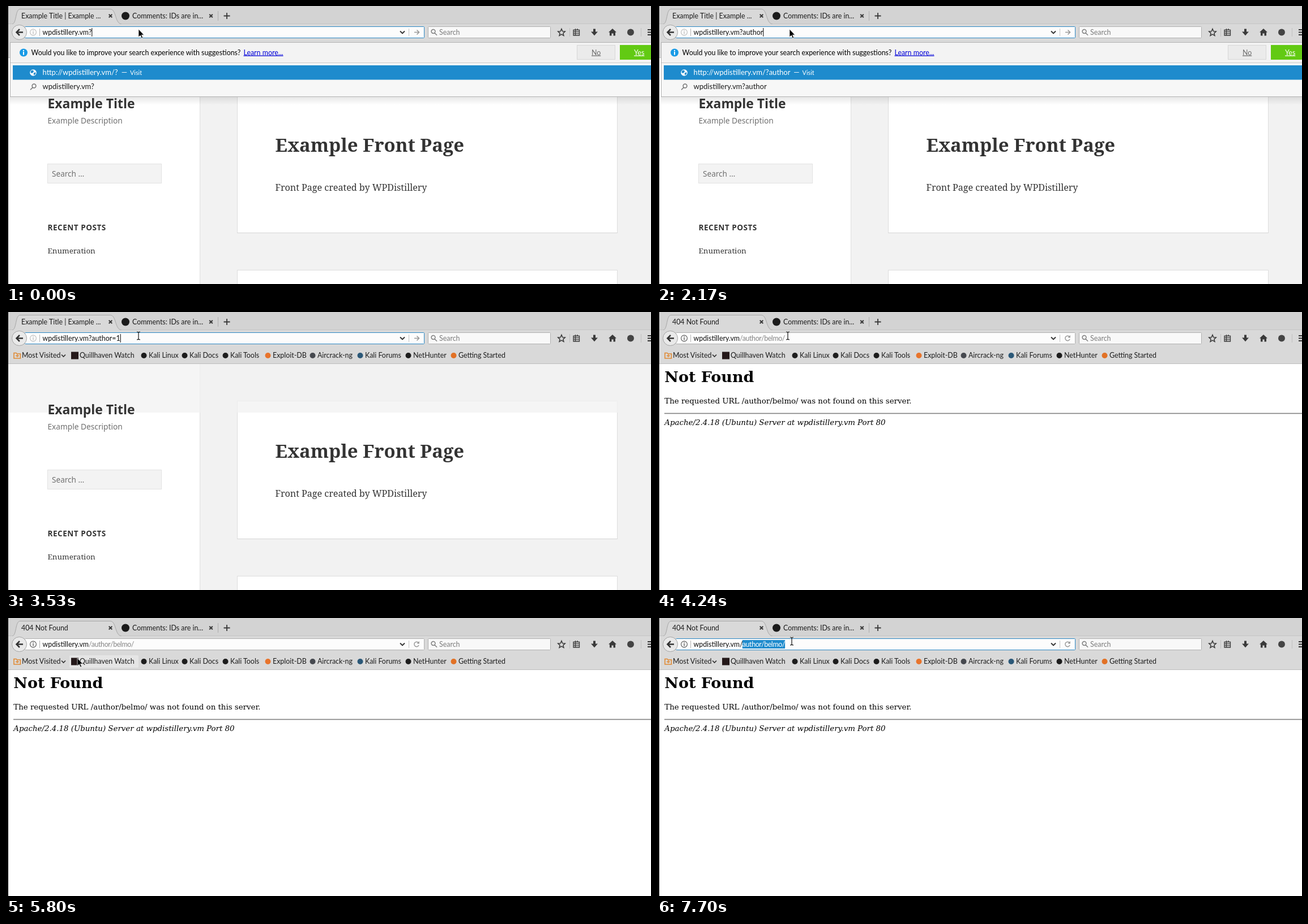
An HTML page for the animation above (8 s loop, 1139 px wide and 492 px high).

```html
<!DOCTYPE html>
<html lang="en">
<head>
<meta charset="utf-8">
<title>Browser address bar</title>
<style>
  html, body { margin: 0; width: 100%; height: 100%; overflow: hidden; background: #fff; }
  svg { display: block; width: 1139px; height: 492px; }
  text { white-space: pre; }
  .ui { font: 12.4px Lato, "Open Sans", sans-serif; fill: #1c1c1c; }
  .list { font-size: 13.05px; }
  .sans { font-family: "Noto Sans", "Open Sans", sans-serif; fill: #333; }
  .serif { font-family: "Noto Serif", serif; fill: #333; }
  .plain { font: 13.36px "DejaVu Serif", serif; fill: #000; }
  .path { letter-spacing: -.38px; }
  .line { fill: none; stroke: #3a3a3a; stroke-width: 1.7; }
</style>
</head>
<body>
<svg id="stage" viewBox="0 0 1139 492" xmlns="http://www.w3.org/2000/svg"></svg>
<script>
const LOOP = 8000;
const HOST = 'wpdistillery.vm';

const typed = [
  [0, '?'], [120, '?a'], [270, '?au'], [550, '?aut'], [830, '?auth'], [950, '?autho'],
  [1100, '?authoe'], [1220, '?authoer'], [2020, '?autho'], [2170, '?author'],
  [2700, '?author='], [3410, '?author=1'], [3650, '/?author=1'], [3800, '/author/belmo/']
];
const phases = [[0, 'typing'], [3530, 'closing'], [3650, 'loading'], [3800, 'loaded'], [7060, 'select']];
// number of selected characters
const picks = [[0, 0], [7190, 6], [7310, 13]];
const hovers = [[0, false], [4940, true], [5100, false], [5250, true], [5950, false]];
// time, x, y, shape
const pointers = [
  [0, 234, 41, 'arrow'], [3530, 234, 42, 'beam'], [4240, 231, 42, 'beam'],
  [4390, 207, 43, 'beam'], [4520, 184, 45, 'beam'], [4670, 158, 44, 'beam'],
  [4820, 142, 58, 'arrow'], [4940, 124, 70, 'arrow'], [5100, 120, 53, 'arrow'],
  [5250, 117, 57, 'arrow'], [5410, 181, 14, 'arrow'], [5560, 193, 16, 'arrow'],
  [5680, 162, 44, 'beam'], [5800, 126, 71, 'arrow'], [5950, 142, 59, 'arrow'],
  [6080, 158, 52, 'beam'], [6230, 158, 43, 'beam'], [6380, 156, 43, 'beam'],
  [6500, 154, 43, 'beam'], [6630, 152, 42, 'beam'], [7190, 187, 41, 'beam'],
  [7310, 225, 41, 'beam'], [7450, 229, 40, 'beam'], [7570, 234, 40, 'beam'], [7700, 238, 41, 'beam']
];

const rect = (x, y, w, h, fill, more = '') =>
  `<rect x="${x}" y="${y}" width="${w}" height="${h}" fill="${fill}" ${more}/>`;
const dot = (x, y, r, fill, more = '') => `<circle cx="${x}" cy="${y}" r="${r}" fill="${fill}" ${more}/>`;
const stroke = (d, color = '#3a3a3a', width = 1.7) =>
  `<path class="line" d="${d}" style="stroke:${color};stroke-width:${width}"/>`;
const shape = (d, fill) => `<path d="${d}" fill="${fill}"/>`;
const text = (x, y, s, cls = 'ui', style = '', id = '') =>
  `<text x="${x}" y="${y}" id="${id}" class="${cls}" style="${style}">${s}</text>`;
const cross = (x, y, r, width = 2, color = '#3a3a3a') =>
  stroke(`M${x - r} ${y - r}l${2 * r} ${2 * r}m0 ${-2 * r}l${-2 * r} ${2 * r}`, color, width);
const lens = (x, y, side, color) =>
  stroke(`M${x + side * 1.5 + 3.4} ${y - 1.5}a3.4 3.4 0 1 0 -6.8 0a3.4 3.4 0 1 0 6.8 0` +
    `M${x - side * 1} ${y + 1.2}L${x - side * 5} ${y + 5.2}`, color, 1.5);
const group = (id, body) => `<g id="${id}">${body}</g>`;

function tabs() {
  return rect(4, 0, 1135, 32, '#d3d3d3') +
    stroke('M4 31.5H1139', '#c4c4c4', 1) +
    `<path d="M11 32C19 31 16 5.5 25 5.5H184C195 5.5 192 31 204 32" fill="#d9d9d9" stroke="#a6a6a6"/>` +
    text(27, 22, '', 'ui', '', 'tabTitle') + cross(184.5, 17.5, 2.8) +
    dot(211, 17.5, 7, '#1b1b1b') + text(223, 22, 'Comments: IDs are in...') + cross(362, 17.5, 2.8) +
    stroke('M374.5 9V26', '#adadad', 1) + stroke('M384.5 17.5h11m-5.5 -5.5v11', '#3a3a3a', 1.8);
}

function toolbar() {
  return rect(4, 32, 1135, 60, '#d9d9d9') +
    rect(33.5, 36.5, 705, 20, '#fcfcfc', 'id="field" rx="1"') +
    dot(23.5, 46.5, 13, '#e9e9e9', 'stroke="#a2a2a2"') +
    stroke('M30 46.5H19M24 41l-5.5 5.5l5.5 5.5', '#333', 2.5) +
    group('info', dot(48, 46.5, 5.4, 'none', 'stroke="currentColor" stroke-width="1.1"') +
      rect(47.3, 45.5, 1.4, 4, 'currentColor') + rect(47.3, 43, 1.4, 1.5, 'currentColor')) +
    stroke('M59.5 40V53', '#b4b4b4', 1) +
    rect(0, 39, 0, 15, '#1e8bcd', 'id="mark"') +
    text(64.5, 50.7, '', 'ui', '', 'url') +
    rect(0, 39, 1, 15, '#000', 'id="caret"') +
    stroke('M696 44.5l4 4l4 -4', '#333', 1.9) + stroke('M711.5 40V53', '#c6c6c6', 1) +
    group('go', stroke('M721 46.5h8M725.5 42.5l4 4l-4 4', '#999', 1.6)) +
    group('stop', cross(725, 46.5, 3.5, 1.6, '#999')) +
    group('reload', stroke('M728.5 44A4.2 4.2 0 1 0 729 48', '#999', 1.5) + shape('M729.8 41v4.4h-4.4z', '#999')) +
    rect(745.5, 36.5, 216, 20, '#f8f8f8', 'rx="1" stroke="#b0b0b0"') +
    lens(756, 46.5, -1, '#808080') + text(765, 50.7, 'Search', 'ui', 'fill:#7a7a7a') +
    stroke('M981 40.5l1.8 4.2l4.5 .4l-3.4 3l1 4.4l-3.9 -2.4l-3.9 2.4l1 -4.4l-3.4 -3l4.5 -.4z', '#3a3a3a', 1.5) +
    stroke('M995.5 39V54', '#c0c0c0', 1) +
    stroke('M1002 42.5h10.5v9.5h-10.5zM1002 45.7h10.5M1002 48.9h10.5M1005.5 42V52M1005.5 40v2m3.5 -2v2', '#3a3a3a', 1.3) +
    shape('M1037 40.5h4v5h4l-6 6.8l-6 -6.8h4z', '#3a3a3a') +
    shape('M1071 40l7 6.5h-2v6h-3.5v-4h-3v4H1066v-6h-2z', '#3a3a3a') +
    dot(1103, 46.5, 6, '#444') + stroke('M1121.5 39V54', '#c0c0c0', 1) +
    stroke('M1133 42h8M1133 46.5h8M1133 51h8', '#333', 1.8);
}

function bookmarks() {
  const dark = '#1d1d1d';
  const links = [
    [252, 'Kali Linux', dark], [324, 'Kali Docs', dark], [396, 'Kali Tools', dark],
    [471, 'Exploit-DB', '#e8742c'], [550, 'Aircrack-ng', '#46494f'], [634, 'Kali Forums', '#2b5878'],
    [719, 'NetHunter', dark], [799, 'Getting Started', '#e27125']
  ];
  return rect(112, 66, 122, 22, '#e5e5e5', 'id="hover" rx="2"') +
    stroke('M14 82V72.5h4l1.5 1.5h6v8z', '#e08a35', 1.6) + stroke('M17 77.5h6M20 75v5', '#e08a35', 1.4) +
    text(28, 81, 'Most Visited') + stroke('M98 75.5l3.5 3.5l3.5 -3.5', '#333', 1.7) +
    rect(115, 70.5, 13, 13, '#241819') + text(130, 81, 'Quillhaven Watch') +
    links.map(([x, name, color]) => dot(x - 8.5, 77, 5, color) + text(x, 81, name)).join('') +
    rect(4, 91, 1135, 1, '#bdbdbd');
}

function frontPage() {
  const edge = 'stroke="#dedede"';
  return rect(4, 92, 1135, 400, '#f2f2f2') + rect(4, 92, 338, 400, '#fff') + rect(342, 92, 1, 400, '#dfdfdf') +
    rect(408.5, 157.5, 671, 244, '#fff', edge) + rect(408, 401, 672, 1, '#d6d6d6') +
    rect(408.5, 467.5, 671, 40, '#fff', edge) +
    rect(4, 92, 1135, 86, '#f2f2f2', 'id="veil" opacity=".75"') +
    text(73.5, 181, 'Example Title', 'sans', 'font-size:22.9px;font-weight:700') +
    text(73.5, 208, 'Example Description', 'sans', 'font-size:13.7px;fill:#707070') +
    rect(73.5, 279.5, 201, 34, '#f3f3f3', 'stroke="#e2e2e2"') +
    text(81, 302, 'Search …', 'sans', 'font-size:13.6px;fill:#707070') +
    text(73.5, 397, 'RECENT POSTS', 'sans', 'font-size:13.5px;font-weight:700;letter-spacing:.04em') +
    text(73.5, 438, 'Enumeration', 'serif', 'font-size:13.4px') +
    text(475.5, 258, 'Example Front Page', 'serif', 'font-size:32.8px;font-weight:700') +
    text(475.5, 327, 'Front Page created by WPDistillery', 'serif', 'font-size:16.1px');
}

function errorPage() {
  return rect(4, 92, 1135, 400, '#fff') +
    text(13.3, 124, 'Not Found', 'plain', 'font-size:26.95px;font-weight:700') +
    text(13.3, 161.5, 'The requested URL /author/belmo/ was not found on this server.', 'plain') +
    rect(13, 178.7, 1126, 1.6, '#808080') +
    text(13.3, 199.5, 'Apache/2.4.18 (Ubuntu) Server at wpdistillery.vm Port 80', 'plain', 'font-style:italic');
}

function popup() {
  const under = 'text-decoration:underline;';
  return `<linearGradient id="shade" x2="0" y2="1"><stop stop-opacity=".1"/><stop offset="1" stop-opacity="0"/></linearGradient>` +
    rect(7, 160, 1132, 15, 'url(#shade)') +
    rect(7.5, 64.5, 1140, 96, '#f7f7f7', 'stroke="#b3b3b3"') +
    rect(8, 65, 1131, 35, '#f3f3f3') + rect(8, 100, 1131, 1, '#c9c9c9') +
    dot(31, 82.5, 7, '#1a9be6') + rect(30, 81, 2, 5.5, '#fff') + rect(30, 78, 2, 2, '#fff') +
    text(44.5, 86.5, 'Would you like to improve your search experience with suggestions?', 'ui', 'fill:#000') +
    text(419.5, 86.5, 'Learn more...', 'ui', under + 'fill:#0000d8') +
    rect(1008.5, 69.5, 67, 25, '#ebebeb', 'stroke="#d6d6d6"') + text(1034, 86.5, 'No', 'ui', under + 'fill:#6a6a6a') +
    rect(1084, 69, 60, 26, '#62ca13') + text(1109, 86.5, 'Yes', 'ui', under + 'fill:#fff') +
    rect(12, 105, 1127, 25.5, '#1e8bcd') +
    dot(48, 118, 5.8, '#fff') + shape('M44 114.5l4 -1l1 3l-3 2.5l-2.5 -1zM48.5 119l3.5 -2l.5 3l-3 2.8z', '#1e8bcd') +
    text(64.5, 122.3, '', 'ui list', '', 'visit') +
    lens(48, 143, 1, '#777') + text(64.5, 147.3, '', 'ui list', '', 'query');
}

const pointerShapes =
  group('arrow', '<path d="M0 0V14L3.3 11L5.5 16L7.6 15.1L5.4 10.2H9.6Z" stroke="#fff" stroke-width=".7"/>') +
  group('beam', stroke('M-3 -7q2.5 0 3 1.2q.5 -1.2 3 -1.2M0 -6V6M-3 7q2.5 0 3 -1.2q.5 1.2 3 1.2', '#111', 1.2));

const stage = document.getElementById('stage');
stage.innerHTML = group('front', frontPage()) + group('error', errorPage()) +
  tabs() + toolbar() + bookmarks() + group('popup', popup()) + pointerShapes + rect(0, 0, 4, 492, '#000');

const $ = id => document.getElementById(id);
const show = (id, on) => $(id).setAttribute('display', on ? 'inline' : 'none');
const set = (id, name, value) => $(id).setAttribute(name, value);
const at = (table, t) => table.reduce((last, row) => row[0] <= t ? row : last);
const span = (s, fill, cls = '') => `<tspan class="${cls}" style="fill:${fill}">${s}</tspan>`;

function drawAddress(path, focused, picked, phase) {
  const url = $('url');
  const cls = path[0] === '/' ? 'path' : '';
  if (phase === 'select') {
    url.innerHTML = span(HOST, '#111') + span('/', '#111', cls) +
      span(path.slice(1, 1 + picked), '#fff', cls) + span(path.slice(1 + picked), '#111', cls);
  } else {
    url.innerHTML = span(HOST, '#111') + span(path, focused ? '#111' : '#858585', cls);
  }
  const start = 64.5 + url.getSubStringLength(0, HOST.length + 1);
  const end = picked ? 64.5 + url.getSubStringLength(0, HOST.length + 1 + picked) : start;
  set('mark', 'x', start);
  set('mark', 'width', end - start);
  set('caret', 'x', phase === 'select' ? start : 64.5 + url.getComputedTextLength());
  show('caret', focused && !picked);
}

function draw(t) {
  const phase = at(phases, t)[1];
  const path = at(typed, t)[1];
  const [, x, y, kind] = at(pointers, t);
  const early = phase === 'typing' || phase === 'closing';
  const focused = early || phase === 'select';

  show('front', early);
  show('error', !early);
  show('popup', phase === 'typing');
  show('veil', phase === 'closing');
  show('hover', at(hovers, t)[1]);
  show('go', early);
  show('stop', phase === 'loading');
  show('reload', phase === 'loaded' || phase === 'select');
  set('field', 'stroke', focused ? '#2c88c4' : '#b0b0b0');
  set('info', 'color', early ? '#bdbdbd' : '#555');

  $('tabTitle').textContent = early ? 'Example Title | Example ...' :
    phase === 'loading' ? 'Connecting…' : '404 Not Found';
  drawAddress(path, focused, at(picks, t)[1], phase);
  $('visit').innerHTML = span(`http://${HOST}/${path}`, '#fff') +
    '<tspan dx="6" style="fill:#fff">—</tspan><tspan dx="5" style="fill:#fff;font-size:10.8px">Visit</tspan>';
  $('query').textContent = HOST + path;

  for (const id of ['arrow', 'beam']) show(id, id === kind);
  set(kind, 'transform', `translate(${x} ${y})`);
}

function tick() {
  draw(performance.now() % LOOP);
  requestAnimationFrame(tick);
}
tick();
</script>
</body>
</html>
```
